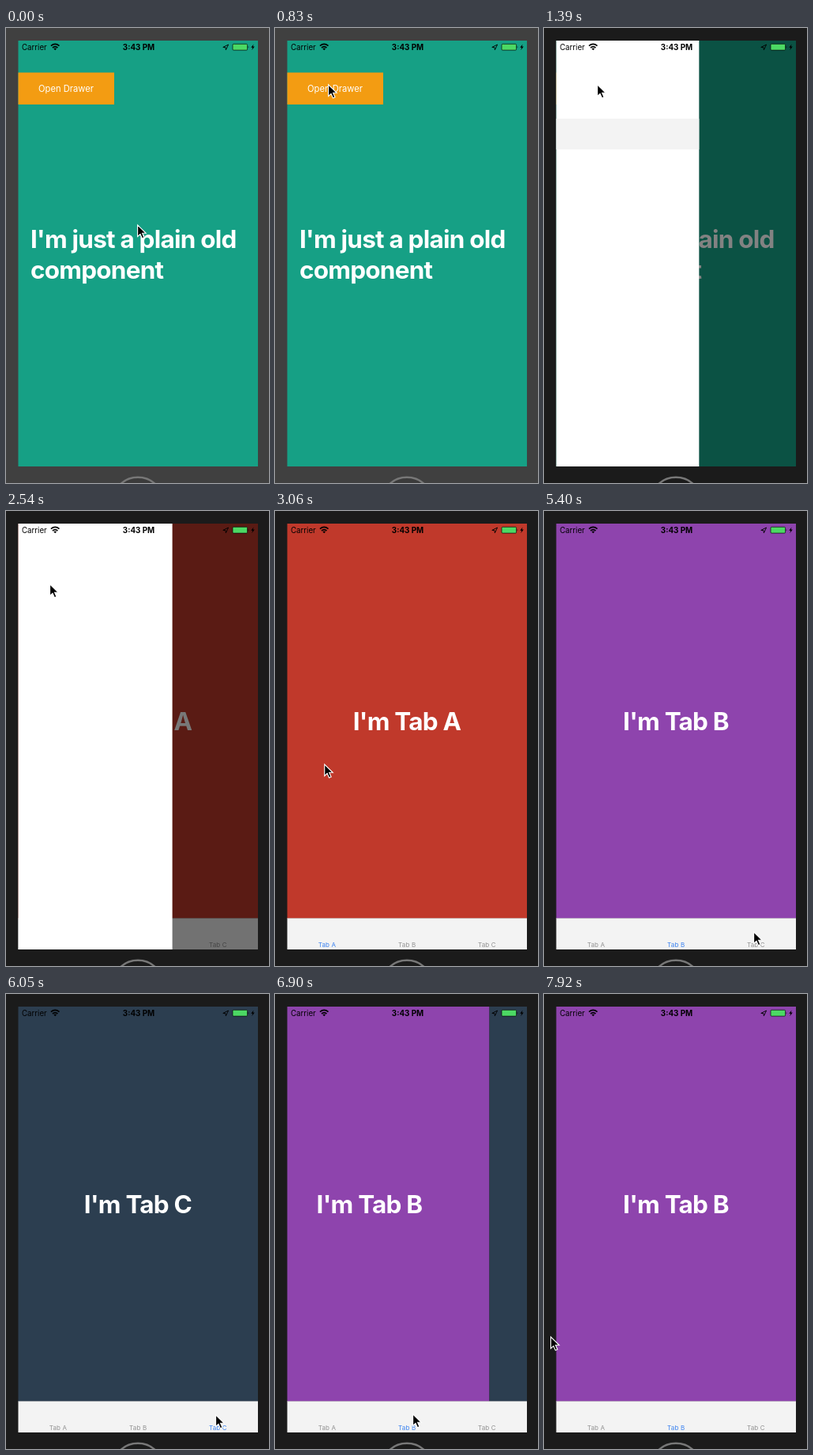
An HTML page that plays this animation: 333x577 px, repeating every 8000 ms.

```html
<!DOCTYPE html>
<html lang="en">
<head>
<meta charset="utf-8">
<title>Drawer and tabs</title>
<style>
  html, body { margin: 0; width: 100%; height: 100%; overflow: hidden; background: #1b1b1b; }
  svg { display: block; width: 333px; height: 577px; font-family: Inter, Roboto, sans-serif; }
  .title { font-size: 31.5px; font-weight: 700; letter-spacing: -.025em; fill: #fff; }
  .mid { text-anchor: middle; }
  .tab { font-size: 8px; letter-spacing: .02em; }
  .item { font-size: 11px; font-weight: 700; }
</style>
</head>
<body>
<svg viewBox="0 0 333 577">
  <defs>
    <clipPath id="screen"><rect x="15.5" y="16" width="303.5" height="540"/></clipPath>
  </defs>
  <rect id="bezel" width="333" height="577"/>
  <circle cx="167" cy="602.5" r="32.7" fill="#1b1b1b" fill-opacity=".15" stroke="#777" stroke-width="2.5"/>

  <g clip-path="url(#screen)">
    <g id="plain">
      <rect x="15" y="16" width="304" height="540" fill="#16a085"/>
      <g id="button">
        <rect x="15" y="56.5" width="122" height="40.5" fill="#f39c12"/>
        <text class="mid" x="76" y="81" font-size="11.2" fill="#fff">Open Drawer</text>
      </g>
      <text class="title" x="31" y="279">I'm just a plain old</text>
      <text class="title" x="31" y="317.5">component</text>
    </g>
    <g id="tabs">
      <g id="pages"></g>
      <rect x="15" y="516.5" width="304" height="40" fill="#f3f3f3"/>
      <rect x="15" y="516.5" width="304" height=".5" fill="#b2b2b2"/>
      <g id="labels"></g>
    </g>
    <rect id="dim" x="15" y="16" width="304" height="540"/>
    <g id="drawer">
      <rect x="15" y="16" width="258" height="540" fill="#fff"/>
      <rect id="active" x="15" y="115" width="258" height="39" fill="#f3f3f3"/>
      <text id="item" class="item" x="28" y="99.5" fill="#222">Tabs</text>
      <text class="item" x="28" y="138.5" fill="#2196f3">Plain</text>
    </g>
  </g>

  <g id="status">
    <text x="20" y="28" font-size="9.7">Carrier</text>
    <g fill="none" stroke="#000" stroke-width="1.7">
      <path d="M56.9 22.6Q62.2 18.2 67.5 22.6M59 25Q62.2 22.3 65.4 25"/>
    </g>
    <path d="M60.4 26.3Q62.2 24.9 64 26.3L62.2 28.3Z"/>
    <text class="mid" x="168" y="28" font-size="9.8" font-weight="700">3:43 PM</text>
    <path d="M274.8 24.4L281.6 21L278.4 27.8L278 24.7Z" fill="none" stroke="#000" stroke-width=".9"/>
    <rect x="287" y="20.3" width="18.6" height="7.8" rx="1.2" fill="#4cd964" stroke="#000" stroke-opacity=".75" stroke-width=".9"/>
    <path d="M306.7 22.8q1.3 1.4 0 2.8z"/>
    <path d="M313.6 20.5L310.2 24.8H312.2L311.3 28L314.8 23.4H312.7Z"/>
  </g>

  <path id="cursor" d="M.6 .8V15.4L4 12.3L6.4 17.8L9 16.7L6.6 11.3H11.2Z" stroke="#fff" stroke-width="1.1"/>
</svg>
<script>
const LOOP = 8000, PAGE_W = 304, DRAWER_W = 258;
const $ = id => document.getElementById(id);

const pages = [["A", "#c0392b"], ["B", "#8e44ad"], ["C", "#2c3e50"]];
pages.forEach(([name, color], i) => {
  const x = 15 + i * PAGE_W;
  $("pages").innerHTML += `<rect x="${x}" y="16" width="${PAGE_W}" height="501" fill="${color}"/>
    <text class="title mid" x="${x + 152}" y="278">I'm Tab ${name}</text>`;
  $("labels").innerHTML += `<text class="tab mid" x="${66 + i * 101.2}" y="553">Tab ${name}</text>`;
});
const labels = [...$("labels").children];

// Pointer stops: time, x, y
const path = [
  [0, 166, 249], [300, 166, 249], [830, 67, 71], [1700, 67, 71], [2030, 94, 92],
  [2220, 55, 92], [2560, 55, 92], [3060, 62, 320], [3320, 140, 467], [3610, 151, 532],
  [4350, 151, 532], [4570, 218, 532], [4650, 234, 532], [4980, 234, 532], [5040, 265, 533],
  [6050, 265, 533], [6400, 174, 532], [7050, 174, 532], [7510, 32, 434], [7920, 8, 434],
  [LOOP, 8, 434]
];

const clamp = v => Math.min(1, Math.max(0, v));
const ramp = (t, from, to) => clamp((t - from) / (to - from));

// Decelerating move whose first visible step comes 40 ms late
function run(t, start, length, power, lead = 0) {
  if (t < start + 40) return 0;
  const u = clamp((t - start) / length);
  return 1 - (1 - u) ** power * (1 + lead * u);
}
const slide = (t, start) => run(t, start, 335, 2.6, 1.7);

// Slope at a stop; zero where the pointer rests on either side
function slope(i, k) {
  const a = path[i - 1], b = path[i], c = path[i + 1];
  if (!a || !c || a[k] === b[k] || b[k] === c[k]) return 0;
  return (c[k] - a[k]) / (c[0] - a[0]);
}

function pointer(t, k) {
  const i = Math.max(0, path.findIndex(p => p[0] > t) - 1);
  const a = path[i], b = path[i + 1], d = b[0] - a[0], u = (t - a[0]) / d;
  const s = u * u * (3 - 2 * u);
  return a[k] + (b[k] - a[k]) * s
    + d * u * (1 - u) * ((1 - u) * slope(i, k) - u * slope(i + 1, k));
}

const show = (id, on) => $(id).setAttribute("display", on ? "inline" : "none");
const move = (id, x, y = 0) => $(id).setAttribute("transform", `translate(${x} ${y})`);
const fade = (id, value) => $(id).setAttribute("opacity", value);

function draw(t) {
  const inTabs = t >= 2540;
  $("bezel").setAttribute("fill", t < 1240 ? "#404040" : "#1b1b1b");
  show("plain", !inTabs);
  show("tabs", inTabs);
  show("active", !inTabs);
  fade("button", 1 - .6 * (ramp(t, 1040, 1100) - ramp(t, 1240, 1390)));
  fade("item", 1 - .6 * ramp(t, 2350, 2390));

  const open = run(t, 1240, 400, 2.56) - run(t, 2500, 400, 2.56);
  move("drawer", (open - 1) * DRAWER_W);
  fade("dim", .7 * open);

  const toB = slide(t, 3883), toC = slide(t, 5510), back = slide(t, 6690);
  move("pages", -(toB + toC - back) * PAGE_W);
  const current = (toB > 0) + (toC > 0) - (back > 0);
  labels.forEach((el, i) => el.setAttribute("fill", i === current ? "#3b82f0" : "#929292"));

  move("cursor", pointer(t, 1), pointer(t, 2));
}

const begin = performance.now();
function tick() {
  draw((performance.now() - begin) % LOOP);
  requestAnimationFrame(tick);
}
tick();
</script>
</body>
</html>
```
